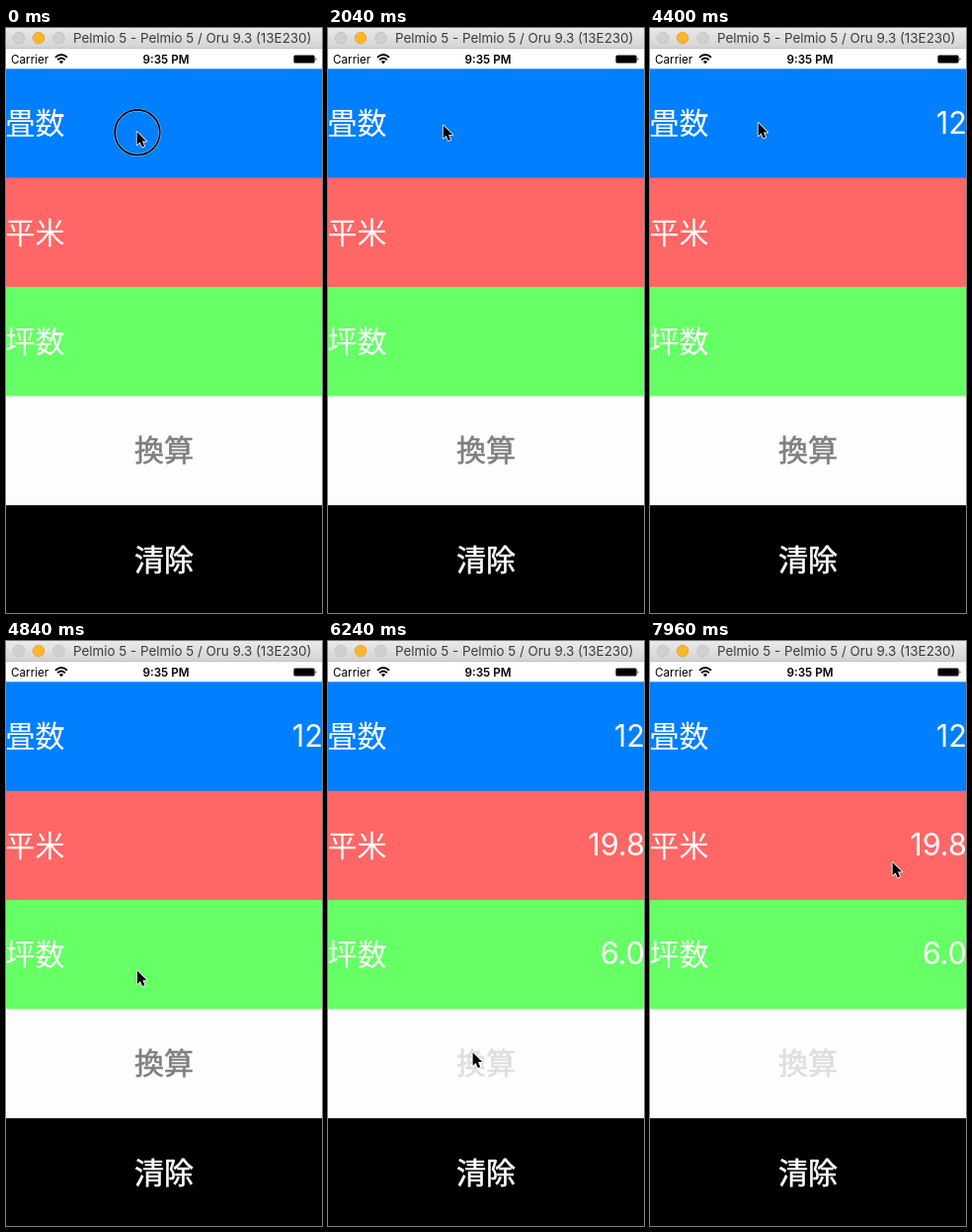
Animation of 320x592 px, one loop 8 s. Source, as an HTML page:

```html
<!DOCTYPE html>
<html lang="ja">
<head>
<meta charset="utf-8">
<title>Area converter</title>
<style>
  html, body { margin: 0; width: 100%; height: 100%; overflow: hidden; background: #000; }
  svg { display: block; width: 320px; height: 592px; }
  text { font-family: Inter, "Liberation Sans", sans-serif; }
  .label { font: 300 30px "Noto Sans CJK JP", "Noto Sans CJK", sans-serif; }
  .button { font-weight: 400; text-anchor: middle; stroke: currentColor; stroke-width: .6; }
  .value { font-size: 30.5px; fill: #fff; text-anchor: end; }
</style>
</head>
<body>
<svg viewBox="0 0 320 592">
  <defs>
    <linearGradient id="bar" x2="0" y2="1">
      <stop stop-color="#eaeaea"/>
      <stop offset="1" stop-color="#d2d2d2"/>
    </linearGradient>
  </defs>

  <rect width="320" height="21" fill="url(#bar)"/>
  <rect y="20.5" width="320" height="1" fill="#b4b4b4"/>
  <g stroke-width=".7" fill="#d0d0d0" stroke="#bcbcbc">
    <circle cx="13" cy="10" r="5.8"/>
    <circle cx="33" cy="10" r="5.8" fill="#fdb52b" stroke="#dfa023"/>
    <circle cx="53.5" cy="10" r="5.8"/>
  </g>
  <text x="188.7" y="15" font-size="13.4" text-anchor="middle" fill="#3c3c3c">Pelmio 5 - Pelmio 5 / Oru 9.3 (13E230)</text>

  <rect y="21" width="320" height="22" fill="#fff"/>
  <text x="5" y="35.5" font-size="11.7">Carrier</text>
  <g fill="none" stroke="#000" stroke-width="1.9">
    <path d="M50 29.8Q56 24.4 62 29.8M52.2 32.2Q56 28.8 59.8 32.2"/>
    <path d="M56 36.2L53.9 33.9Q56 32.2 58.1 33.9Z" fill="#000" stroke="none"/>
  </g>
  <text x="162" y="35.5" font-size="11.7" font-weight="600" text-anchor="middle">9:35 PM</text>
  <rect x="291.4" y="27.4" width="21.2" height="8.2" rx="1.5"/>
  <path d="M313.6 29.8Q315.4 31.5 313.6 33.2Z"/>

  <g id="rows"></g>

  <g id="pointer">
    <g id="tap" fill="none">
      <circle cx="1" cy="1.7" r="22.8" stroke="#fff" stroke-opacity=".45" stroke-width="3"/>
      <circle cx="1" cy="1.7" r="22.8" stroke="#000" stroke-width="1.6"/>
    </g>
    <path d="M.6 1V14.2L3.6 11.5L5.8 16.5L8.1 15.5L6 10.6H10.1Z"
          stroke="#fff" stroke-width="1.6" paint-order="stroke" stroke-linejoin="round"/>
  </g>
</svg>
<script>
const LOOP = 8000, STEP = 40;
const ROW_TOP = 41.3, ROW_HEIGHT = 110.4;

const rows = [
  { title: "畳数", fill: "#007fff" },
  { title: "平米", fill: "#ff6666" },
  { title: "坪数", fill: "#66ff66" },
  { title: "換算", fill: "#fdfdfd", button: true },
  { title: "清除", fill: "#000", button: true }
];

const home = [132, 104];
const moves = [
  { from: 1320, to: 1640, end: [127, 104], power: 1 },
  { from: 1840, to: 2200, end: [109, 95], power: 1.6 },
  { from: 4520, to: 5360, end: [144, 398], power: 3.2 },
  { from: 5360, to: 5760, end: [146, 415.5], power: 1.6 },
  { from: 6840, to: 7680, end: [237, 228], power: 1.9 },
  { from: 7680, to: 7960, end: [245, 223], power: 1 }
];

document.getElementById("rows").innerHTML = rows.map(({ title, fill, button }, i) => {
  const top = ROW_TOP + i * ROW_HEIGHT;
  return `<rect y="${top}" width="320" height="${ROW_HEIGHT + 1}" fill="${fill}"/>
    <text class="label ${button ? "button" : ""}" x="${button ? 160 : -.6}" y="${top + 65.8}"
      fill="currentColor" color="#fff">${title}</text>
    <text class="value" x="320.8" y="${top + 65.3}"></text>`;
}).join("");

const [mats, metres, tsubo] = document.querySelectorAll(".value");
const convert = document.querySelector(".button");
const pointer = document.getElementById("pointer");
const tap = document.getElementById("tap");

const easeOut = (k, power) => 1 - (1 - k) ** power;

// Sideways travel eases more gently than vertical, which bends the path.
function pointerAt(t) {
  let [x, y] = home;
  for (const { from, to, end, power } of moves) {
    const k = Math.min(1, Math.max(0, (t - from) / (to - from)));
    x += (end[0] - x) * easeOut(k, Math.max(1, power * .72));
    y += (end[1] - y) * easeOut(k, power);
  }
  return [x, y];
}

function render(time) {
  const t = Math.floor((time % LOOP) / STEP) * STEP;
  const tapping = t < 120 || (t >= 5880 && t < 6040);
  const converted = t >= 6240;
  pointer.setAttribute("transform", `translate(${pointerAt(t)})`);
  tap.setAttribute("visibility", tapping ? "visible" : "hidden");
  mats.textContent = t < 3320 ? "" : t < 4400 ? "1" : "12";
  metres.textContent = converted ? "19.8" : "";
  tsubo.textContent = converted ? "6.0" : "";
  convert.setAttribute("color", t < 5920 ? "#7f7f7f" : "#dedede");
}

let start;
function tick(now) {
  start ??= now;
  render(now - start);
  requestAnimationFrame(tick);
}
render(0);
requestAnimationFrame(tick);
</script>
</body>
</html>
```
